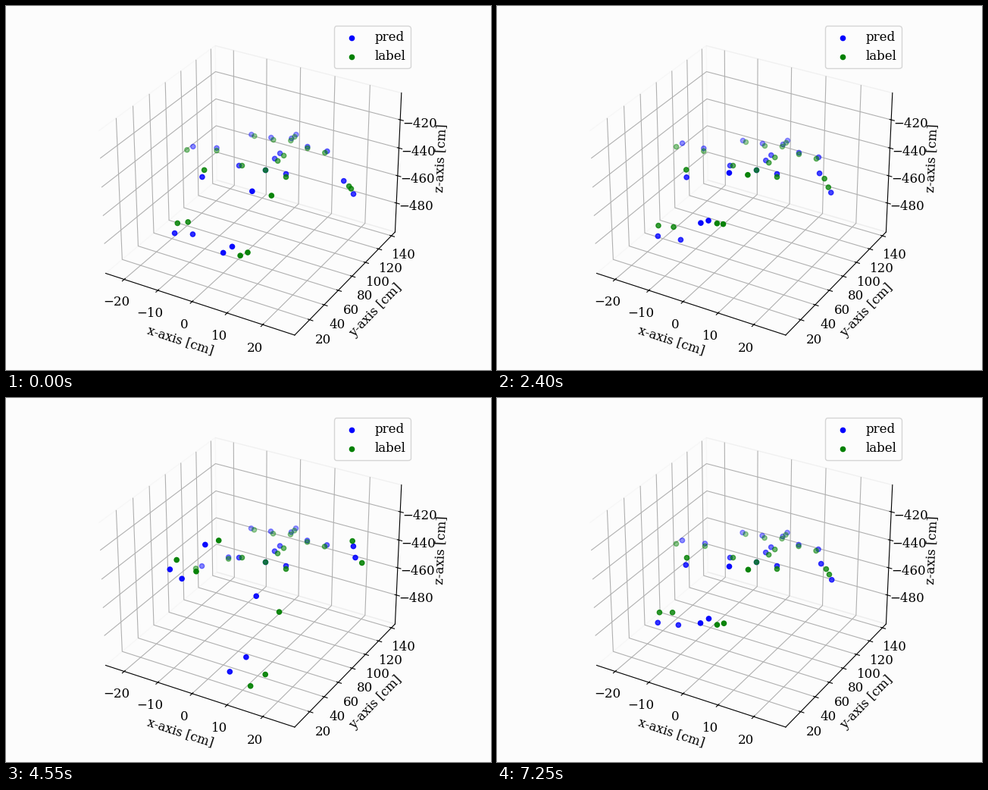
Recreate the animation shown at these times as a matplotlib script. Size 640 by 480 pixels, loop 7300 ms.

```python
import numpy as np
import matplotlib.pyplot as plt
from matplotlib.animation import FuncAnimation

W, H, STEP, LOOP = 640, 480, 50, 7300
PERIOD, FIRST_OPEN = 1605, 430  # ms: one open-close-open cycle of the hand
BG = "#fcfcfc"

plt.rcParams.update({
    "font.family": "DejaVu Serif", "font.size": 12,
    "figure.facecolor": BG, "axes.facecolor": BG,
})


class Finger:
    """Joints moving along curves through their open, half and closed places."""

    def __init__(self, swing, drag, shade, *joints):
        self.swing = np.array(swing)  # opening and closing paths lie apart
        self.drag = np.array(drag)    # extra prediction error when closed
        self.shade = shade            # opacity when open and closed
        self.open, self.half, self.closed, self.miss = np.array(joints, float).swapaxes(0, 1)

    def pose(self, phase, predicted):
        b = bend(phase)
        xy = ((1 - b) * (1 - 2 * b) * self.open + 4 * b * (1 - b) * self.half
              + b * (2 * b - 1) * self.closed + self.swing * np.sin(phase))
        if predicted:
            xy = xy + self.miss + self.drag * b**2
        alpha = self.shade[0] + (self.shade[1] - self.shade[0]) * b
        return np.column_stack([xy, np.full(len(xy), alpha)])


class Palm:
    """Knuckles that stay near one place and sway a little."""

    def __init__(self, sway, *joints):
        self.sway = sway
        self.place, self.miss = np.array(joints, float).swapaxes(0, 1)

    def pose(self, phase, predicted):
        drift = np.array([9 * (1 - bend(phase))**4, 4 * np.sin(phase)])
        xy = self.place + self.sway * drift
        if predicted:
            xy = xy + self.miss
        # Lower knuckles are closer to the viewer.
        alpha = .38 + .0075 * (self.place[:, 1] - 175)
        return np.column_stack([xy, alpha])


def bend(phase):
    return (1 - np.cos(phase)) / 2


HAND = [
    # place, prediction error
    Palm(1, [(327, 175), (-4, -2)], [(352, 180), (-3, -3)], [(375, 181), (1, -3)],
         [(380, 176), (2, -3)], [(397, 191), (0, -2)], [(420, 197), (3, -2)]),
    Palm(.3, [(366, 198), (-5, -3)], [(358, 205), (-4, -3)]),
    Palm(0, [(342, 216), (0, 0)], [(369, 225), (0, -4)], [(311, 210), (-4, 0)]),
    # open, half, closed, prediction error
    Finger((-8, -7), (-3, 0), (.62, .88),
           [(432, 243), (442, 232), (469, 212), (-6, -7)],
           [(436, 274), (446, 239), (454, 179), (4, 7)]),
    Finger((-1, 4), (0, 2), (.41, .48),
           [(269, 158), (275, 191), (295, 215), (0, -4)],
           [(249, 134), (237, 188), (252, 229), (8, -5)]),
    Finger((-5, -5), (-25, -6), (.63, .98),
           [(265, 258), (255, 215), (282, 183), (5, 11)],
           [(243, 333), (236, 287), (221, 202), (14, 18)],
           [(225, 323), (219, 287), (253, 219), (4, 15)]),
    Finger((-9, -10), (-8, -25), (1, .92),
           [(346, 223), (340, 236), (359, 283), (-23, 2)],
           [(321, 226), (308, 307), (343, 364), (-18, 0)],
           [(314, 203), (299, 309), (322, 380), (-20, 4)]),
]

fig = plt.figure(figsize=(W / 100, H / 100), dpi=100)
pad = 18 / H
ax = fig.add_axes([0, pad, 1, 1 - 2 * pad], projection="3d")
ax.set(xlim=(-25.6, 28.8), ylim=(-.2, 145.9), zlim=(-501.6, -401.3),
       xticks=range(-20, 21, 10), yticks=range(20, 141, 20),
       zticks=range(-480, -419, 20),
       xlabel="x-axis [cm]", ylabel="y-axis [cm]", zlabel="z-axis [cm]")
for axis in (ax.xaxis, ax.yaxis, ax.zaxis):
    axis.pane.fill = False

# The dots are placed in stage pixels, on top of the 3D box.
screen = fig.add_axes([0, 0, 1, 1])
screen.set(xlim=(0, W), ylim=(H, 0))
screen.axis("off")

COLORS = {"pred": (0, 0, 1), "label": (0, .5, 0)}
dots = {name: screen.scatter([0], [0], s=20, color=[color], label=name)
        for name, color in COLORS.items()}
ax.legend(handles=list(dots.values()), loc="upper right")


def update(frame):
    phase = 2 * np.pi * (frame * STEP - FIRST_OPEN) / PERIOD
    for name, color in COLORS.items():
        p = np.vstack([part.pose(phase, name == "pred") for part in HAND])
        p = p[np.argsort(p[:, 2], kind="stable")]  # far joints first
        dots[name].set_offsets(p[:, :2] + .5)
        dots[name].set_color([(*color, min(a, 1)) for a in p[:, 2]])
    return list(dots.values())


anim = FuncAnimation(fig, update, frames=LOOP // STEP, interval=STEP,
                     repeat=True, repeat_delay=0)
plt.show()
```
